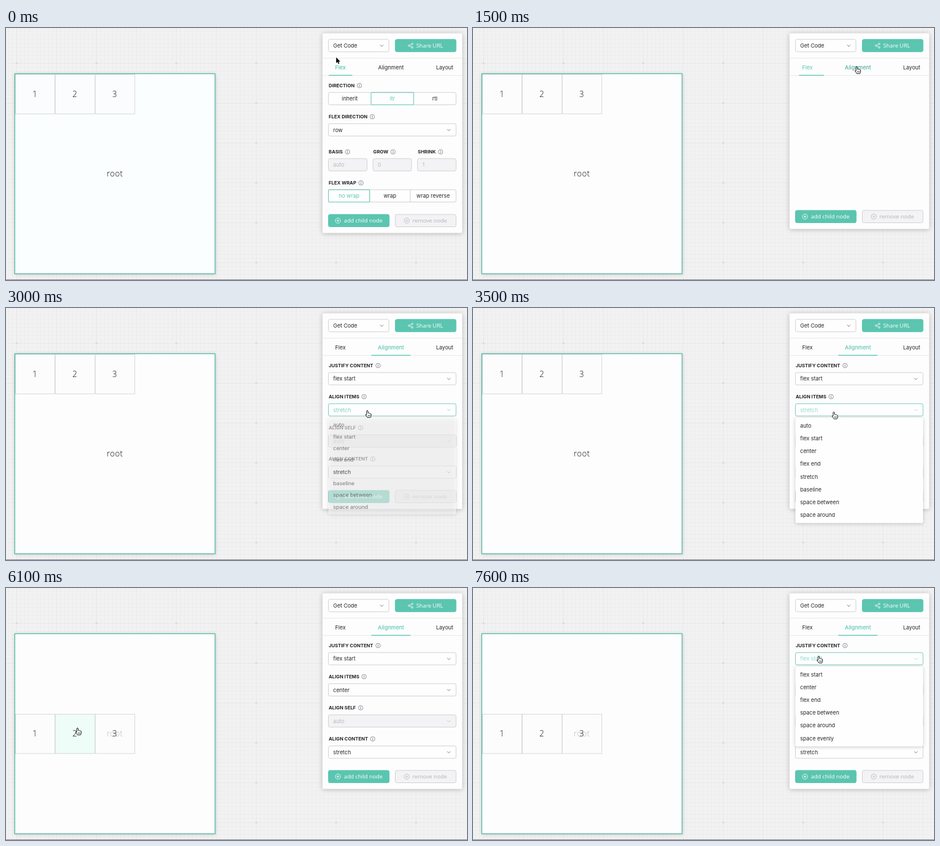
An HTML page with a canvas for the animation above (8 s loop, 800 by 438 pixels).

```html
<!DOCTYPE html>
<html lang="en">
<head>
<meta charset="utf-8">
<title>Flexbox playground</title>
<style>
html, body { margin: 0; width: 100%; height: 100%; overflow: hidden; }
canvas { display: block; }
</style>
</head>
<body>
<canvas id="stage" width="800" height="438"></canvas>
<script>
const g = document.getElementById('stage').getContext('2d');
const LOOP = 8000, STEP = 100, CELL = 69.3;
const INK = [38, 38, 40], TEAL = [91, 197, 176], PALE = [142, 216, 201], LINE = [208, 208, 210];
const PAPER = [253, 253, 254], MINT = [238, 253, 248], OFF = '#b9b9bb';
const UI = 'Inter, sans-serif', SOFT = '"Open Sans", sans-serif';
const ITEMS = ['auto', 'flex start', 'center', 'flex end', 'stretch', 'baseline', 'space between', 'space around'];
const JUSTIFY = ['flex start', 'center', 'flex end', 'space between', 'space around', 'space evenly'];

// Pointer tip: time, x, y
const PATH = [
  [0, 573, 51], [400, 573, 67], [750, 573, 67], [1350, 666, 67], [1650, 666, 67],
  [2200, 627, 178], [3450, 627, 178], [3900, 603, 250], [4850, 603, 250],
  [5200, 64, 233], [5600, 64, 233], [5800, 124, 243], [6550, 124, 243], [7100, 600, 118], [LOOP, 600, 118]
];
const ARROW = new Path2D('M0 0V10L2.3 8 3.9 11.6 5.5 10.9 4 7.4H7.2Z');
const HAND = new Path2D('M-1.2 7.5V1Q0-.8 1.2 1V4.5Q2.5 3.6 3.2 5Q4.5 4.4 5.1 5.6Q6.6 5.3 6.6 7V9.2Q6.4 11 5.4 12.3H.2Q-1.6 9.8-3 7.8Q-3.2 6.3-1.2 7.5Z');
const KNUCKLES = new Path2D('M1.3 8v2.4M2.9 8v2.4M4.5 8v2.4');

const ramp = (t, a, b) => {
  const k = Math.min(1, Math.max(0, (t - a) / (b - a)));
  return k * k * (3 - 2 * k);
};
const pulse = (t, a, b, c, d) => ramp(t, a, b) * (1 - ramp(t, c, d));
const lerp = (a, b, k) => a + (b - a) * k;
const blend = (a, b, k) => a.map((v, i) => lerp(v, b[i], k));
const rgb = c => `rgb(${c.map(Math.round)})`;

function pointerAt(t) {
  const i = PATH.findIndex(p => p[0] > t);
  const [t0, x0, y0] = PATH[i - 1], [t1, x1, y1] = PATH[i], k = ramp(t, t0, t1);
  return { x: lerp(x0, x1, k), y: lerp(y0, y1, k) };
}

function box(x, y, w, h, fill, stroke, r = 2.8) {
  g.beginPath();
  g.roundRect(x, y, w, h, r);
  if (fill) { g.fillStyle = fill; g.fill(); }
  if (stroke) { g.strokeStyle = stroke; g.lineWidth = 1; g.stroke(); }
}

function shadowed(blur, alpha, dy, draw) {
  g.save();
  g.shadowBlur = blur;
  g.shadowOffsetY = dy;
  g.shadowColor = `rgba(0,0,0,${alpha})`;
  draw();
  g.restore();
}

function text(str, x, y, color, font = `9.35px ${UI}`, align = 'left') {
  g.font = font;
  g.textAlign = align;
  g.fillStyle = color;
  g.fillText(str, x, y);
}

function line(color, width, ...pts) {
  g.beginPath();
  pts.forEach(([x, y], i) => i ? g.lineTo(x, y) : g.moveTo(x, y));
  g.strokeStyle = color;
  g.lineWidth = width;
  g.stroke();
}

function ring(x, y, r, color, width = .8) {
  g.beginPath();
  g.arc(x, y, r, 0, 7);
  g.strokeStyle = color;
  g.lineWidth = width;
  g.stroke();
}

function label(str, x, y) {
  text(str, x, y + 3.1, rgb(INK), `700 8.2px ${UI}`);
  const cx = x + g.measureText(str).width + 8.3, c = '#77777a';
  ring(cx, y, 3.9, c);
  line(c, 1, [cx, y - .7], [cx, y + 2.2]);
  line(c, 1, [cx, y - 2.3], [cx, y - 1.3]);
}

function select(x, y, w, value, { hover = 0, open = 0, off = false } = {}) {
  box(x, y, w, 21.5, off ? '#f3f2f4' : '#fefefe', rgb(blend(LINE, TEAL, hover * .75)));
  const color = off ? OFF : rgb(blend(blend(INK, TEAL, hover), PALE, open));
  text(value, x + 8.3, y + 14.2, color);
  const cx = x + w - 12.5, cy = y + 10.9;
  line(off ? OFF : open ? color : '#666', .9, [cx - 2.7, cy - 1.3], [cx, cy + 1.4], [cx + 2.7, cy - 1.3]);
}

function radio(y, stops, names, active) {
  box(559.5, y, 221.5, 21.5, '#fefefe', rgb(LINE));
  stops.slice(1, -1).forEach(x => line(rgb(LINE), 1, [x, y], [x, y + 21.5]));
  names.forEach((name, i) => {
    const on = i === active, [a, b] = stops.slice(i, i + 2);
    if (on) box(a, y, b - a, 21.5, null, rgb(TEAL), 1);
    text(name, (a + b) / 2, y + 14.2, rgb(on ? TEAL : INK), undefined, 'center');
  });
}

function dropdown(y, items, k, mouse) {
  if (!k) return;
  g.save();
  g.globalAlpha = k;
  g.translate(0, y);
  g.scale(1, .8 + .2 * k);
  const h = items.length * 22.17 + 5.5;
  shadowed(6, .22, 1, () => box(559.5, 0, 221.5, h, '#fefefe'));
  items.forEach((name, i) => {
    const top = 2.7 + i * 22.17, rel = mouse.y - y - top;
    if (rel >= 0 && rel < 22.17) box(559.5, top, 221.5, 22.17, rgb(MINT), null, 0);
    text(name, 567.8, top + 14.2, rgb(INK));
  });
  g.restore();
}

function background() {
  g.fillStyle = '#f3f2f3';
  g.fillRect(0, 0, 800, 438);
  const grid = (gap, color) => {
    for (let x = 18.4 % gap; x < 800; x += gap) line(color, .7, [x, 0], [x, 438]);
    for (let y = 61.2 % gap; y < 438; y += gap) line(color, .7, [0, y], [800, y]);
  };
  grid(CELL / 10, 'rgba(0,0,0,.034)');
  grid(CELL, 'rgba(0,0,0,.035)');
  const tick = 'rgba(0,0,0,.1)';
  for (let x = 18.4; x < 800; x += CELL * 2)
    for (let y = 61.2; y < 438; y += CELL) {
      line(tick, .7, [x - 3, y], [x + 3, y]);
      line(tick, .7, [x, y - 3], [x, y + 3]);
    }
  g.fillStyle = '#858587';
  g.fillRect(0, 437, 800, 1);
}

function canvasNodes(t) {
  const big = `300 14px ${SOFT}`, top = t < 4000 ? 80.2 : 218.9;
  const tint = 1 - ramp(t, 0, 450);
  shadowed(7, .16, 1, () => box(14.5, 78.7, 349, 349, '#fff', null, 0));
  box(15.2, 79.4, 347.6, 347.6, rgb(blend(PAPER, [250, 254, 255], tint)), null, 0);
  g.letterSpacing = '.6px';
  text('root', 189, 258.4, '#111', big, 'center');
  const hover = [pulse(t, 5100, 5300, 5650, 5850), pulse(t, 5700, 5950, 6600, 6850), 0];
  hover.forEach((k, i) => {
    const x = 16 + i * CELL;
    box(x, top, CELL, CELL, `rgba(253,253,254,.72)`, null, 0);
    if (k) box(x, top, CELL, CELL, `rgba(${MINT},${k})`, null, 0);
    g.strokeStyle = '#c6c6c8';
    g.lineWidth = .7;
    g.strokeRect(x + .35, top + .35, CELL - .7, CELL - .7);
    text(i + 1, x + 34.2, top + 39.5, '#111', big, 'center');
  });
  g.letterSpacing = '0px';
  g.strokeStyle = '#5abba7';
  g.lineWidth = 1.5;
  g.strokeRect(15.2, 79.4, 347.6, 347.8);
}

function flexTab() {
  label('DIRECTION', 560, 100);
  radio(112, [559.5, 633.5, 707.5, 781], ['inherit', 'ltr', 'rtl'], 1);
  label('FLEX DIRECTION', 560, 154.2);
  select(559.5, 166.3, 221.5, 'row');
  [['BASIS', 'auto'], ['GROW', '0'], ['SHRINK', '1']].forEach(([name, value], i) => {
    const x = 559.5 + i * 77.3;
    label(name, x + .5, 215.3);
    box(x, 227, 67, 21.5, '#f3f2f4', rgb(LINE));
    text(value, x + 8.3, 241.2, OFF);
  });
  label('FLEX WRAP', 560, 269.2);
  radio(281, [559.5, 631, 701.5, 781], ['no wrap', 'wrap', 'wrap reverse'], 0);
}

function alignTab(t, openItems, openJustify) {
  const rows = [
    ['JUSTIFY CONTENT', 'flex start', { hover: ramp(t, 6950, 7300), open: openJustify }],
    ['ALIGN ITEMS', t < 4000 ? 'stretch' : 'center', { hover: pulse(t, 2000, 2450, 4000, 4300), open: openItems }],
    ['ALIGN SELF', 'auto', { off: true }],
    ['ALIGN CONTENT', 'stretch', {}]
  ];
  rows.forEach(([name, value, state], i) => {
    label(name, 560, 100 + i * 54.1);
    select(559.5, 112.2 + i * 54.1, 221.5, value, state);
  });
}

function buttons(y) {
  const font = `9.7px ${SOFT}`, c = y + 10.8, w = '#fff', gray = '#b4b4b6';
  box(559.5, y, 105.5, 21.5, rgb(TEAL), rgb(TEAL));
  ring(576, c, 4.5, w);
  line(w, .9, [573.6, c], [578.4, c]);
  line(w, .9, [576, c - 2.4], [576, c + 2.4]);
  text('add child node', 586.5, y + 14.3, w, font);
  box(675.5, y, 105.5, 21.5, '#f3f2f4', rgb(LINE));
  ring(695.5, c, 4.5, gray);
  line(gray, .9, [693.8, c - 1.7], [697.2, c + 1.7]);
  line(gray, .9, [693.8, c + 1.7], [697.2, c - 1.7]);
  text('remove node', 705.3, y + 14.3, gray, font);
}

function shareButton() {
  box(675.5, 19.8, 105.5, 21.5, rgb(TEAL), rgb(TEAL));
  line('#fff', .9, [705, 27.6], [699.5, 30.7], [705, 33.8]);
  [[705, 27.6], [699.3, 30.7], [705, 33.8]].forEach(([x, y]) => {
    box(x - 1.5, y - 1.5, 3, 3, rgb(TEAL), null, 1.5);
    ring(x, y, 1.4, '#fff');
  });
  text('Share URL', 712, 34.2, '#fff', `9.7px ${SOFT}`);
}

function panel(t, mouse) {
  const bottom = t < 1450 ? 356.3 : 349.3;
  shadowed(9, .24, 1, () => box(549.3, 9.3, 242.4, bottom - 9.3, rgb(PAPER)));
  select(559.5, 19.8, 105, 'Get Code');
  shareButton();
  line('#e9e9eb', 1, [549.3, 52.5], [791.7, 52.5]);
  line('#e9e9eb', 1, [549.3, 82.5], [791.7, 82.5]);

  const tab = (name, x, k, bold) =>
    text(name, x, 72.3, rgb(blend(INK, TEAL, k)), `${bold ? 500 : 400} 9.35px ${UI}`, 'center');
  tab('Flex', 580.3, 1 - ramp(t, 1500, 1800), t < 1450);
  tab('Alignment', 668, ramp(t, 1250, 1580), t >= 1450);
  tab('Layout', 761.3, 0, false);
  const slide = ramp(t, 1440, 1790);
  g.fillStyle = rgb(TEAL);
  g.fillRect(lerp(560, 634, slide), 81.6, lerp(41, 68, slide), 1.4);

  const openItems = pulse(t, 2750, 3200, 3950, 4300), openJustify = ramp(t, 7200, 7550);
  g.save();
  g.beginPath();
  g.rect(549.3, 83, 242.4, 273);
  g.clip();
  if (t < 1450) {
    g.globalAlpha = 1 - ramp(t, 1350, 1450);
    flexTab();
  } else {
    const k = ramp(t, 1500, 1900);
    g.globalAlpha = k;
    g.translate(lerp(160, 0, k), 0);
    if (k) alignTab(t, openItems, openJustify);
  }
  g.restore();
  buttons(bottom - 32.3);
  dropdown(191, ITEMS, openItems, mouse);
  dropdown(136.8, JUSTIFY, openJustify, mouse);
}

function pointer(t, { x, y }) {
  const onRoot = x < 363 && y > 79;
  const onTab = y > 56 && y < 82 && (x < 601 || x > 634 && x < 702);
  const onSelect = x > 559 && t > 1800 && (y > 112 && y < 134 || y > 166 && y < 188);
  const onMenu = t > 3450 && t < 4300 && y > 190;
  const hand = onRoot || onTab || onSelect || onMenu;
  g.save();
  g.translate(x, y);
  g.lineJoin = 'round';
  if (hand) {
    g.fillStyle = '#fff';
    g.strokeStyle = '#111';
    g.lineWidth = 1;
    g.fill(HAND);
    g.stroke(HAND);
    g.lineWidth = .7;
    g.stroke(KNUCKLES);
  } else {
    g.strokeStyle = '#fff';
    g.lineWidth = 1.4;
    g.stroke(ARROW);
    g.fillStyle = '#000';
    g.fill(ARROW);
  }
  g.restore();
}

const start = performance.now();
function frame() {
  const t = Math.floor((performance.now() - start) % LOOP / STEP) * STEP;
  const mouse = pointerAt(t);
  background();
  canvasNodes(t);
  panel(t, mouse);
  pointer(t, mouse);
  requestAnimationFrame(frame);
}
frame();
</script>
</body>
</html>
```
